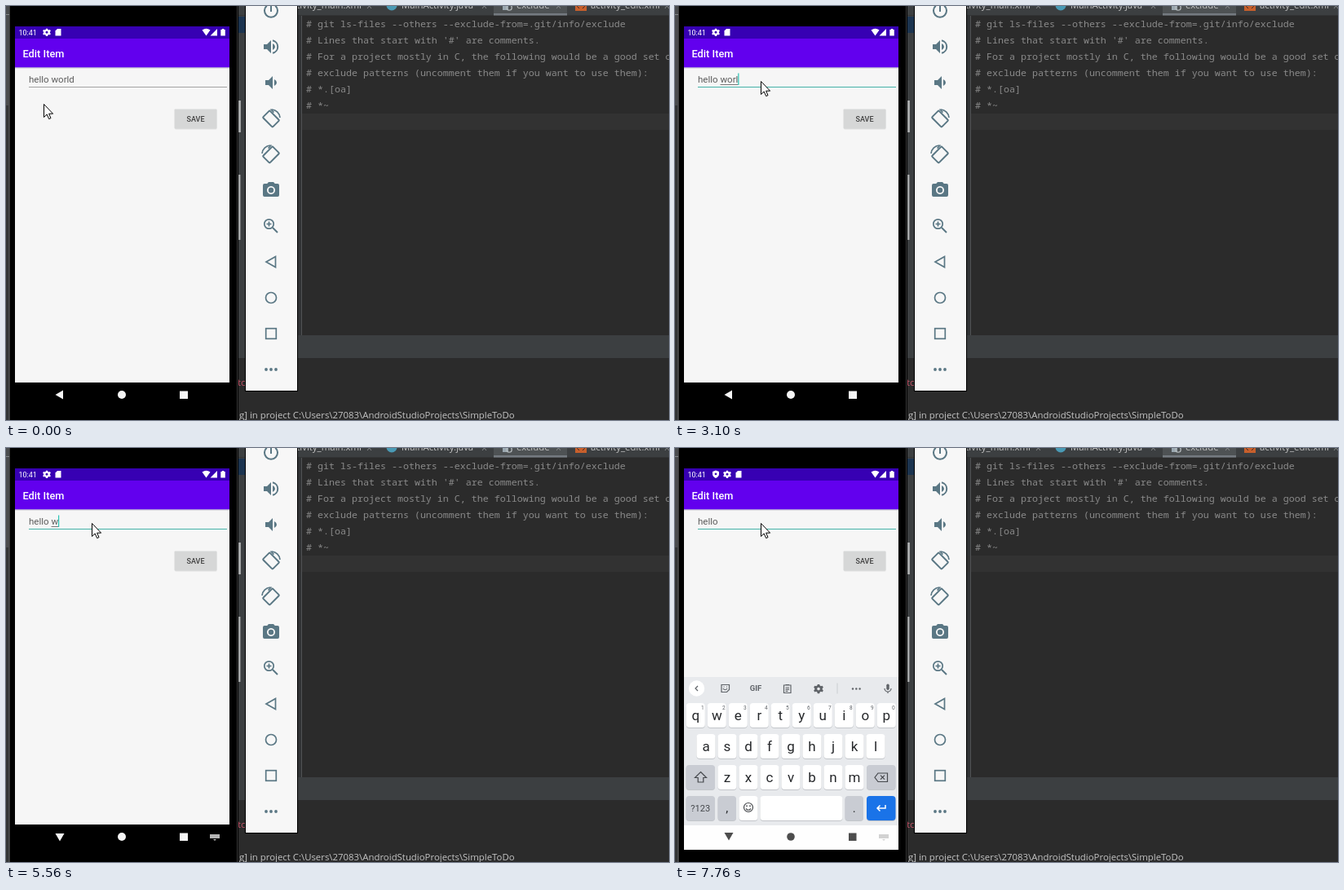
An HTML page for the animation above (8000 ms loop, 813 px wide and 508 px high).

```html
<!DOCTYPE html>
<html lang="en">
<head>
<meta charset="utf-8">
<title>Edit Item</title>
<style>
html, body { margin: 0; width: 100%; height: 100%; overflow: hidden; background: #2b2b2b; }
svg { display: block; }
text { white-space: pre; }
.ui { font: 11.4px "Open Sans", sans-serif; fill: #c4c4c4; }
.code { font: 11.67px "Noto Sans Mono", monospace; fill: #8a8a8a; }
.app { font-family: Roboto, sans-serif; }
.line { fill: none; stroke: currentColor; stroke-width: 2; }
.thin { stroke-width: 1.7; }
.key { font-size: 17px; text-anchor: middle; fill: #26282b; }
.hint { font-size: 6.5px; text-anchor: middle; fill: #5f6368; }

.t { animation: 8s step-end infinite; }
.hide { visibility: hidden; }
.pointer { transform: translate(46px, 120px); animation-name: pointer; }
.rule { fill: #a3a3a3; animation-name: rule; }
.caret { animation-name: caret; }
.compose { width: 0; animation-name: compose; }
.handle { animation-name: handle; }
.c5 { animation-name: c5; } .c4 { animation-name: c4; } .c3 { animation-name: c3; }
.c2 { animation-name: c2; } .c1 { animation-name: c1; }
.ime { animation-name: ime; }
.back { transform-origin: 66px 477px; animation-name: back; }
.board { animation-name: board; }
.ghost { animation-name: ghost; }
.late { animation-name: late; }
.icons { animation-name: icons; }

@keyframes pointer {
  6.875% { transform: translate(63px, 115px); }
  8.375% { transform: translate(93px, 98px); }
  10% { transform: translate(105px, 92px); }
}
@keyframes rule { 18.875% { fill: #45b3a8; } }
@keyframes caret {
  22.75% { visibility: visible; transform: translateX(83.6px); }
  26.5% { visibility: hidden; }
  33.5% { visibility: visible; transform: translateX(83.6px); }
  38.75% { visibility: visible; transform: translateX(77.2px); }
  57.75% { visibility: visible; transform: translateX(74.4px); }
  61% { visibility: visible; transform: translateX(70.5px); }
  69.5% { visibility: visible; transform: translateX(64px); }
  79.875% { visibility: visible; transform: translateX(55.5px); }
  89.25% { visibility: hidden; transform: translateX(55.5px); }
  93.25% { visibility: visible; transform: translateX(55.5px); }
  97% { visibility: hidden; }
}
@keyframes compose {
  33.5% { width: 28.3px; }
  38.75% { width: 21.9px; }
  57.75% { width: 19.1px; }
  61% { width: 15.2px; }
  68% { width: 8.7px; }
  79.875% { width: 0; }
}
@keyframes handle { 28.5% { visibility: visible; } 37.125% { visibility: hidden; } }
@keyframes c5 { 38.75% { visibility: hidden; } }
@keyframes c4 { 57.75% { visibility: hidden; } }
@keyframes c3 { 61% { visibility: hidden; } }
@keyframes c2 { 68% { visibility: hidden; } }
@keyframes c1 { 79.875% { visibility: hidden; } }
@keyframes ime { 54.25% { visibility: visible; } }
@keyframes back {
  56.125% { transform: rotate(-35deg); }
  59.375% { transform: rotate(-90deg); }
}
@keyframes board { 91.125% { visibility: visible; } }
@keyframes ghost { 91.125% { visibility: visible; } 95.375% { visibility: hidden; } }
@keyframes late { 95.375% { visibility: visible; } }
@keyframes icons { 95.375% { transform: translateX(14px); } }
</style>
</head>
<body>
<svg width="813" height="508" viewBox="0 0 813 508">
  <defs>
    <path id="gear" d="M-1 -4.6h2l.4 1.3 1.1.6 1.4-.5 1 1.7-1 1v1.1l1 1-1 1.7-1.4-.5-1.1.6-.4 1.3h-2l-.4-1.3-1.1-.6-1.4.5-1-1.7 1-1v-1.1l-1-1 1-1.7 1.4.5 1.1-.6zM0 -1.5a1.5 1.5 0 1 0 .01 0z" fill-rule="evenodd"/>
    <path id="kbd" d="M250 474h12v5h-12zM254 480h4l-2 2z"/>
    <g id="turn">
      <rect class="line" x="-8.5" y="-6" width="17" height="12" rx="1.2" transform="translate(0 .5) rotate(45)"/>
      <path class="line thin" d="M1-11A11 11 0 0 1 11-1"/>
      <path d="M0-12l4 4-1.2 1.2L-1-11z"/>
    </g>
  </defs>

  <!-- editor -->
  <rect width="813" height="508" fill="#2b2b2b"/>
  <rect x="285" width="528" height="11.5" fill="#3c3f41"/>
  <rect x="598" width="90" height="11.5" fill="#4e5254"/>
  <rect x="598" y="9" width="90" height="2.5" fill="#747a80"/>
  <rect x="357" y="11.5" width="6" height="393" fill="#313335"/>
  <rect x="357" y="132" width="456" height="20" fill="#323232"/>
  <rect x="362" y="12" width="1" height="392" fill="#505254"/>
  <rect x="285" y="404" width="528" height="28" fill="#3c3f41"/>
  <g class="ui">
    <text x="436" y="3" text-anchor="end">activity_main.xml</text>
    <text x="485" y="3">MainActivity.java</text>
    <text x="626" y="3">exclude</text>
    <text x="717" y="3">activity_edit.xml</text>
    <text x="286" y="505.5">g] in project C:\Users\27083\AndroidStudioProjects\SimpleToDo</text>
    <text x="284" y="466" style="fill:#c4566a">tc</text>
  </g>
  <path d="M443-3l5 6m0-6l-5 6M584-3l5 6m0-6l-5 6M675-3l5 6m0-6l-5 6M808-3l5 6m0-6l-5 6" stroke="#85888a"/>
  <circle cx="473" cy="-1" r="6.5" fill="#4a9ab5"/>
  <path d="M609 0h7v5h-7z" fill="#9aa7b0"/>
  <circle cx="617" cy="2" r="3.2" fill="none" stroke="#b4babd" stroke-width="1.3"/>
  <rect x="698" y="-6" width="14" height="12" fill="#c75f2c"/>
  <path d="M703-2l-2.5 2.5 2.5 2.5m4-5l2.5 2.5-2.5 2.5" fill="none" stroke="#3c2a22"/>
  <g class="code" id="code"></g>

  <!-- strips beside the phone -->
  <rect x="285" y="12" width="9" height="392" fill="#3c3f41"/>
  <rect x="285" y="13" width="9" height="20" fill="#1c3450"/>
  <path d="M285 116h3v39h-3zM285 207h2.500v80h-2.500z" fill="#a6a8a9"/>
  <rect width="5" height="508" fill="#4a4c4e"/>
  <rect y="10" width="4" height="1" fill="#85888a"/>
  <rect y="122" width="3" height="386" fill="#333536"/>

  <!-- phone -->
  <rect x="4" y="-20" width="281" height="560" fill="#000"/>
  <path d="M4.500 0v508M283.500 0v508" stroke="#3a3a3a"/>
  <rect x="11" y="25" width="263" height="437" fill="#f6f6f6"/>
  <rect x="11" y="75" width="263" height="1" fill="#a78fd8"/>
  <rect x="11" y="76" width="263" height="1" fill="#dfdce4"/>
  <rect x="11" y="25" width="263" height="15" fill="#3700b3"/>
  <rect x="11" y="40" width="263" height="35" fill="#6200ee"/>
  <g class="app">
    <g fill="#fff">
      <text x="15.500" y="36" font-size="9">10:41</text>
      <path class="t late hide" d="M50 27.500l4 1.500v3q0 3-4 5-4-2-4-5v-3zM50 30.500a1.400 1.400 0 1 0 .01 0z" fill-rule="evenodd"/>
      <g class="t icons">
        <use href="#gear" x="50" y="32.300"/>
        <path d="M63 28h4.500v8.500h-7v-6z"/>
      </g>
      <path d="M240.500 29.500q5-3.600 10 0l-5 7zM259 28v8.500h-8.500zM264.800 28h2.500v1h1.500v7.500h-5.500V29h1.500z"/>
      <text x="20.500" y="62.500" font-size="12.800" font-weight="500">Edit Item</text>
    </g>
    <text x="28" y="94" font-size="11.500" fill="#5c5c5c">hello <tspan class="t c1">w</tspan><tspan class="t c2">o</tspan><tspan class="t c3">r</tspan><tspan class="t c4">l</tspan><tspan class="t c5">d</tspan></text>
    <rect class="t rule" x="28" y="99" width="243" height="1"/>
    <rect class="t compose" x="55.500" y="96" height="1" fill="#777"/>
    <rect class="t caret hide" y="82.500" width="1.200" height="14.500" fill="#2cc4b4"/>
    <path class="t handle hide" d="M84 97.500l4.600 4a6.400 6.400 0 1 1-9.200 0z" fill="#03d5c2"/>
    <rect x="207" y="127" width="51.500" height="24.500" rx="1.500" fill="#e2e2e2"/>
    <rect x="206.500" y="126.500" width="52" height="24" rx="1" fill="#d6d7d7"/>
    <text x="232.500" y="141.800" font-size="9" font-weight="500" text-anchor="middle" fill="#3e3e3e">SAVE</text>
  </g>

  <!-- navigation bar -->
  <g fill="#f5f5f5">
    <path class="t back" d="M60.500 477l9.500-5.500v11z"/>
    <circle cx="142" cy="477" r="5"/>
    <rect x="213" y="472.500" width="10" height="9.500"/>
    <use class="t ime hide" href="#kbd" fill="#b5b5b5"/>
  </g>

  <!-- keyboard -->
  <g class="app t board hide">
    <rect x="11" y="281" width="263" height="182" fill="#e8eaed"/>
    <rect x="11" y="463" width="263" height="30" fill="#fefefe"/>
    <circle cx="26.500" cy="295" r="9.700" fill="#fff"/>
    <g fill="none" stroke="#5f6368" stroke-width="1.200">
      <path d="M28 292l-3 3 3 3"/>
      <path d="M57 290.500h9.500v6l-3 3H57zM59 295q2.500 3.500 5 0M59.500 293h1m2.500 0h1"/>
      <path d="M133.500 291h8.500v9.500h-8.500zM135.500 290.500h4.500M135.500 294h4.500M135.500 296.200h4.500M135.500 298.400h3"/>
      <path d="M257 295a4 4 0 0 0 8 0M261 299v2"/>
      <path d="M199 288.500v13" stroke="#cfd2d6"/>
    </g>
    <g fill="#5f6368">
      <text x="99" y="298.300" font-size="9.500" font-weight="700" text-anchor="middle">GIF</text>
      <use href="#gear" transform="translate(176 295.500) scale(1.200)"/>
      <circle cx="218" cy="295.500" r="1.200"/><circle cx="222.300" cy="295.500" r="1.200"/><circle cx="226.600" cy="295.500" r="1.200"/>
      <rect x="259.300" y="289.500" width="3.400" height="7.500" rx="1.700"/>
    </g>
    <g id="keys"></g>
    <g fill="none" stroke="#45484c" stroke-width="1.200">
      <path d="M31.500 397.500l7 7h-3.700v5.500h-6.600v-5.500h-3.700z"/>
      <path d="M249 399h11.500v10.500H249l-4-5.250zM252 401.700l5 5m0-5l-5 5"/>
      <circle cx="90" cy="441" r="5.500"/>
      <path d="M87 442.500q3 3.500 6 0"/>
    </g>
    <path d="M87.200 438.500h1.600v1.600h-1.600zM91.200 438.500h1.600v1.600h-1.600z" fill="#45484c"/>
    <path d="M258 438v4h-10m3.500-3.500l-3.500 3.500 3.500 3.500" fill="none" stroke="#fff" stroke-width="1.500"/>
    <path class="t ghost hide" d="M66.500 481l5-7M138.500 480q3.500 3.500 7 0M213.500 482h9" fill="none" stroke="#d9d9d9" stroke-width="1.500"/>
    <g class="t late hide" fill="#4d4d4d">
      <path d="M60.500 472h11l-5.500 9.500z"/>
      <circle cx="142" cy="477" r="4.800"/>
      <rect x="213" y="472.500" width="9.500" height="9.500"/>
      <use href="#kbd" fill="#d2d2d2"/>
    </g>
  </g>

  <!-- emulator controls -->
  <rect x="293" y="-2" width="65" height="475" fill="#000"/>
  <rect x="294" y="-2" width="63" height="474" fill="#f7f7f7"/>
  <g fill="#5a7784" color="#5a7784">
    <path class="line" d="M325-3V7M319.800-.300a8 8 0 1 0 10.400 0"/>
    <path id="spk" d="M316 47v6h4l5 5V42l-5 5z"/>
    <path d="M327 46q3 1.300 3 4t-3 4z"/>
    <path class="line" d="M327 42.200a8 8 0 0 1 0 15.600"/>
    <use href="#spk" x="2" y="44"/>
    <path d="M329 90q3 1.300 3 4t-3 4z"/>
    <use href="#turn" x="325" y="138"/>
    <use href="#turn" transform="translate(325 182) scale(-1 1)"/>
    <path fill-rule="evenodd" d="M322 216h6l1.800 2h3.200q2 0 2 2v12q0 2-2 2h-16q-2 0-2-2v-12q0-2 2-2h3.200zM325 221a5 5 0 1 0 .01 0z"/>
    <circle cx="325" cy="226" r="3.200"/>
    <circle class="line thin" cx="322.500" cy="267.500" r="5.700"/>
    <path class="line" d="M327 272l6 6"/>
    <path class="line thin" d="M319.500 267.500h6m-3-3v6"/>
    <path class="line thin" d="M319 314l11.500-6.500v13z"/>
    <circle class="line thin" cx="325" cy="358" r="6.500"/>
    <rect class="line thin" x="318.700" y="395.700" width="12.600" height="12.600"/>
    <circle cx="319" cy="446" r="1.900"/><circle cx="325" cy="446" r="1.900"/><circle cx="331" cy="446" r="1.900"/>
  </g>

  <path class="t pointer" d="M.5.500v16l3.700-3.500 2.500 5.600 2.300-1-2.400-5.400h5z" fill="#fff" stroke="#000"/>
</svg>
<script>
const NS = 'http://www.w3.org/2000/svg';
function add(parent, tag, attrs, text = '') {
  const el = document.createElementNS(NS, tag);
  for (const k in attrs) el.setAttribute(k, attrs[k]);
  el.textContent = text;
  document.getElementById(parent).append(el);
}

[
  "# git ls-files --others --exclude-from=.git/info/exclude",
  "# Lines that start with '#' are comments.",
  "# For a project mostly in C, the following would be a good set of",
  "# exclude patterns (uncomment them if you want to use them):",
  "# *.[oa]",
  "# *~"
].forEach((s, i) => add('code', 'text', { x: 368, y: 26 + 20 * i }, s));

function key(x, y, w, fill = '#fff') {
  add('keys', 'rect', { x, y: y + 1, width: w, height: 30, rx: 4, fill: '#c3c6ca' });
  add('keys', 'rect', { x, y, width: w, height: 30, rx: 4, fill });
}
function label(s, x, y, cls = 'key', style = '') {
  add('keys', 'text', { x, y, class: cls, style }, s);
}

[['qwertyuiop', 25.3, 313], ['asdfghjkl', 38, 351], ['zxcvbnm', 64, 389]].forEach(([row, x0, y], r) => {
  [...row].forEach((c, i) => {
    const x = x0 + 26 * i;
    key(x - 11.5, y, 23);
    label(c, x, y + 20.5);
    if (!r) label((i + 1) % 10, x + 8.5, y + 8, 'hint');
  });
});

const GREY = '#c9ccd3';
key(13.5, 389, 35.5, GREY);
key(235, 389, 35.5, GREY);
key(13.5, 427, 35.5, GREY);
key(52.5, 427, 22.5, GREY);
key(78.5, 427, 23);
key(104.5, 427, 101);
key(208.5, 427, 22.5, GREY);
key(235, 427, 35.5, '#1a73e8');
label('?123', 31.2, 445.5, 'key', 'font-size:11px;fill:#45484c');
label(',', 63.7, 447, 'key', 'font-size:15px');
label('.', 219.7, 447, 'key', 'font-size:15px');
</script>
</body>
</html>
```
